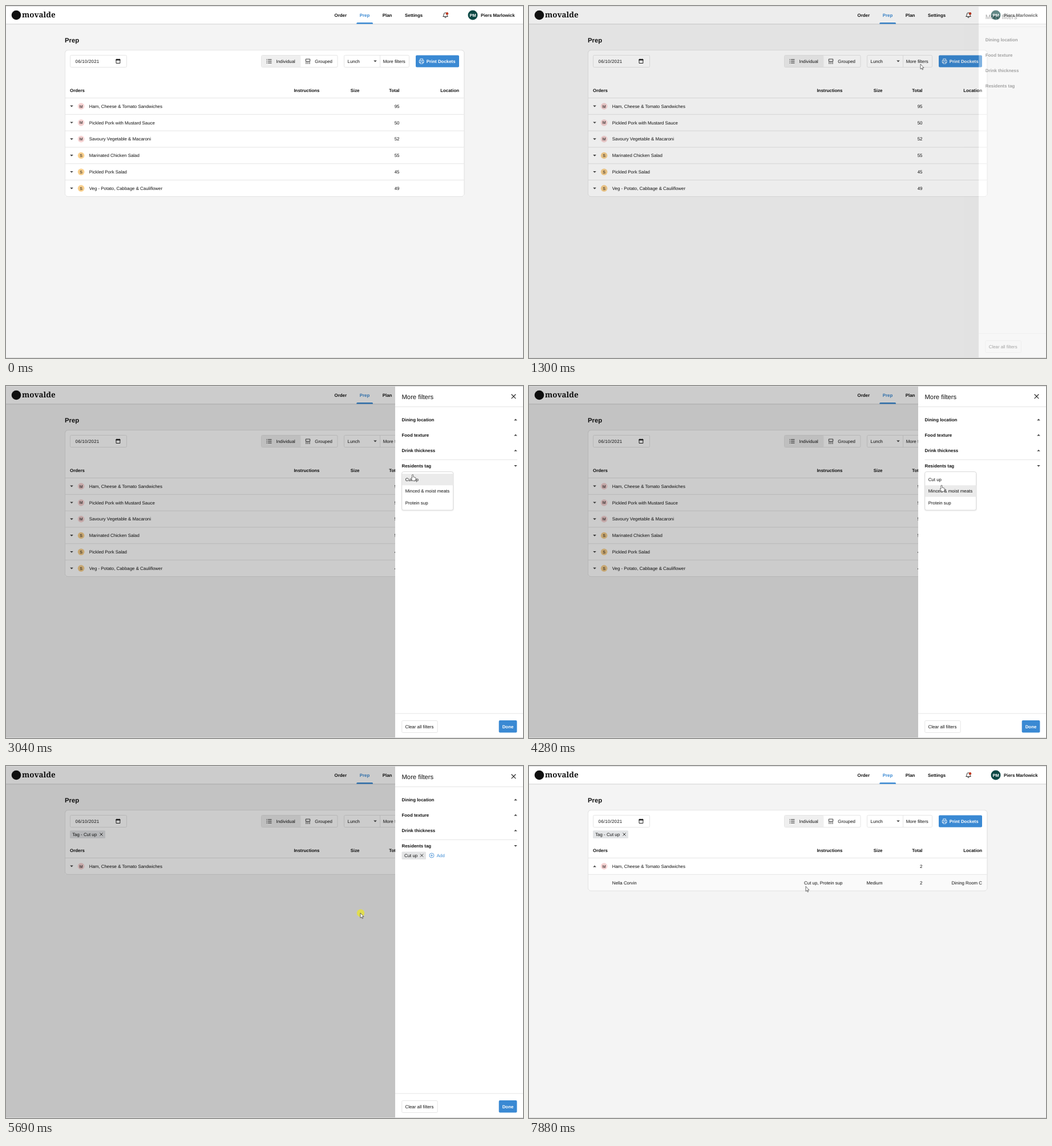
These frames come from a looping animation (906x618 px, 8 s). An HTML page:

```html
<!DOCTYPE html>
<html lang="en">
<head>
<meta charset="utf-8">
<title>Prep</title>
<style>
  html, body { margin: 0; width: 100%; height: 100%; overflow: hidden; background: #f4f4f4; }
  svg { display: block; width: 906px; height: 618px; }
  text { font: 7.88px "Liberation Sans", Arial, sans-serif; fill: #111; text-rendering: geometricPrecision; white-space: pre; }
  .b { font-weight: bold; }
  .h { font-size: 11.25px; }
  .blue { fill: #3a89d3; }
  .w { fill: #fff; }
  .logo { font: bold 13.4px "Noto Serif", serif; }
</style>
</head>
<body>
<svg id="stage" viewBox="0 0 906 618"></svg>
<script>
const BLUE = '#3a89d3', EDGE = '#e5e5e5', DARK = '#222';
const ROW = 28.83, TOP = 161.5;

// Markup helpers; text is placed by its vertical centre.
const text = (x, y, s, cls = '', anchor = 'start', extra = '') =>
  `<text x="${x}" y="${y + (cls.includes('h') ? 4 : 2.8)}" class="${cls}" text-anchor="${anchor}" ${extra}>${s}</text>`;
const rect = (x, y, w, h, fill, r = 0, stroke = 'none', extra = '') =>
  `<rect x="${x}" y="${y}" width="${w}" height="${h}" rx="${r}" fill="${fill}" stroke="${stroke}" ${extra}/>`;
const path = (d, stroke = DARK, w = 1, fill = 'none') =>
  `<path d="${d}" stroke="${stroke}" stroke-width="${w}" fill="${fill}"/>`;
const disc = (x, y, r, fill) => `<circle cx="${x}" cy="${y}" r="${r}" fill="${fill}"/>`;
const group = (id, body, extra = '') => `<g id="${id}" ${extra}>${body}</g>`;
const caret = (x, y, up) => {
  const s = up ? -1 : 1;
  return path(`M${x - 2.8} ${y - 1.4 * s}h5.6L${x} ${y + 1.5 * s}Z`, 'none', 0, '#444');
};
const cross = (x, y, r, w = 0.9) =>
  path(`M${x - r} ${y - r}L${x + r} ${y + r}M${x + r} ${y - r}L${x - r} ${y + r}`, DARK, w);
const addButton = x =>
  `<circle cx="${x}" cy="157" r="4" fill="none" stroke="${BLUE}" stroke-width=".8"/>` +
  path(`M${x - 2} 157h4M${x} 155v4`, BLUE, 0.8) + text(x + 8.8, 157, 'Add', 'blue');

const meals = [
  ['M', 'Ham, Cheese &amp; Tomato Sandwiches', 95],
  ['M', 'Pickled Pork with Mustard Sauce', 50],
  ['M', 'Savoury Vegetable &amp; Macaroni', 52],
  ['S', 'Marinated Chicken Salad', 55],
  ['S', 'Pickled Pork Salad', 45],
  ['S', 'Veg - Potato, Cabbage &amp; Cauliflower', 49]
];

function header() {
  return rect(0, 0, 906, 31.5, '#fff') + rect(0, 31, 906, 1, '#dcdcdc') + rect(0, 32, 906, 1, '#ececec') +
    disc(18, 16, 8.3, '#111') + `<text class="logo" x="28" y="20">movalde</text>` +
    text(575.5, 15.7, 'Order', 'b') + text(619.7, 15.7, 'Prep', 'b blue') +
    text(659.8, 15.7, 'Plan', 'b') + text(699, 15.7, 'Settings', 'b') +
    path('M614.3 31.5V30.5q0-1.5 1.5-1.5h25.700q1.500 0 1.500 1.500v1Z', 'none', 0, BLUE) +
    path('M765.700 18.500q1.500-1.200 1.500-3.500q0-3.200 2.800-3.200t2.800 3.200q0 2.300 1.500 3.500ZM768.800 19.200q0 1.400 1.200 1.400t1.200-1.400', DARK, 0.9) +
    disc(773, 13.3, 2.2, '#c0361c') +
    disc(818, 16, 8.5, '#0b4844') + text(818, 16, 'PM', 'b w', 'middle', 'style="font-size:7.5px"') +
    text(832, 15.7, 'Piers Marlowick', 'b');
}

function toolbar() {
  let list = '';
  for (const y of [94, 97, 100]) list += `M456.5 ${y}h1.4M459 ${y}h6.500`;
  return rect(112.5, 86.5, 99, 21, '#fff', 2, EDGE) +
    text(121.5, 97, '06/10/2021', '', 'start', 'letter-spacing=".26"') +
    path('M193 94h6.800v6.500h-6.800ZM194.700 92.500v1.500M198.100 92.500v1.500') + rect(192.5, 93.5, 7.8, 2, '#111') +
    rect(447.5, 86.5, 133.5, 21, '#fff', 2, EDGE) + rect(448, 87, 68.5, 20, '#efefef', 1.5) +
    path(list) + text(473.5, 97, 'Individual') +
    path('M525.300 93.200h7.400v4h-7.400ZM525 99h2M528 99h2M531 99h2M525 101h2M528 101h2M531 101h2', DARK, 0.9) +
    text(541.3, 97, 'Grouped') +
    rect(592.5, 86.5, 114, 21, '#fff', 2, EDGE) + path('M655.500 86.500v21', EDGE) +
    text(598.5, 97, 'Lunch') + caret(647, 97) + text(660.8, 97, 'More filters') +
    rect(718, 86.5, 76, 21, BLUE, 2) +
    path('M725.800 95.500v-2.700h4.600v2.700M725.800 99.500h-1.600v-4h7.800v4h-1.600M725.800 98h4.600v3.200h-4.600Z', '#fff', 0.8) +
    text(736.8, 97, 'Print Dockets', 'b w');
}

function table() {
  const heads = text(112, 148, 'Orders', 'b') + [['Instructions', 549.5], ['Size', 619.5], ['Total', 689.5], ['Location', 794]]
    .map(([s, x]) => text(x, 148, s, 'b', 'end')).join('');
  const rows = meals.map(([kind, name, total], i) => {
    const y = TOP + i * ROW, mid = y + 14.5;
    return group('row' + i,
      `<rect id="bg${i}" x="104" y="${y}" width="698.500" height="${ROW - 0.5}" fill="#fff"/>` +
      path(`M104 ${y}h698.5`, EDGE) +
      group('down' + i, caret(115, mid)) +
      disc(131.6, mid, 5.8, kind === 'M' ? '#f6d3d3' : '#f9d08e') +
      text(131.6, mid - 0.2, kind, '', 'middle', 'style="font-size:7px"') +
      text(145.8, mid, name) + text(689.5, mid, total, '', 'end', `id="sum${i}"`));
  }).join('');
  const y = TOP + ROW, mid = y + 14.5;
  const detail = rect(104, y, 698.5, ROW - 0.5, '#fafafa') + path(`M104 ${y}h698.500`, EDGE) +
    text(145.8, mid, 'Nella Corvin') + text(549.5, mid, 'Cut up, Protein sup', '', 'end') +
    text(619.5, mid, 'Medium', '', 'end') + text(689.5, mid, '2', '', 'end') + text(794, mid, 'Dining Room C', '', 'end');
  return heads + rows + group('up', caret(115, TOP + 14.5, true)) + group('detail', detail);
}

function panel() {
  const names = ['Dining location', 'Food texture', 'Drink thickness', 'Residents tag'];
  const sections = names.map((s, i) => text(693.5, 59 + 27.1 * i, s, 'b') +
    (i < 3 ? caret(893, 59 + 27.1 * i, true) : '')).join('');
  const items = ['Cut up', 'Minced &amp; moist meats', 'Protein sup'].map((s, i) =>
    rect(694, 154 + 20.3 * i, 89.5, 20.3, '#ebebeb', 0, 'none', `id="item${i}"`) +
    text(699.7, 164 + 20.4 * i, s)).join('');
  return rect(682, 0, 224, 618, '#fff') +
    text(693.5, 18.5, 'More filters', 'h') + cross(889.5, 18.3, 3.8, 1.1) +
    path('M682 36.500h224M682 575h224', EDGE) + sections +
    group('shut', caret(893, 140.3, true)) +
    group('open', path('M693.500 129.500H896', EDGE) + caret(893, 140.3)) +
    group('add', addButton(698.3)) +
    group('menu', rect(692.5, 151, 92.500, 69, '#000', 4, 'none', 'opacity=".05"') +
      rect(693.7, 150.5, 90, 67.500, '#fff', 3, '#d9d9d9') + items) +
    group('chip', rect(693.5, 150.5, 42.5, 13.5, '#e3e4e5', 1.5) + text(698, 157, 'Cut up') +
      cross(728.6, 157, 2.5) + addButton(746)) +
    rect(693.7, 587.5, 62.5, 21, '#fff', 2, EDGE) + text(699.5, 597.7, 'Clear all filters') +
    rect(863.7, 587, 31.700, 21.500, BLUE, 2) + text(879.5, 597.7, 'Done', 'b w', 'middle');
}

document.getElementById('stage').innerHTML =
  rect(0, 0, 906, 618, '#f4f4f4') + header() + text(103, 60, 'Prep', 'b h') +
  rect(103.5, 77.5, 699.5, 257, '#fff', 5, EDGE, 'id="card"') + toolbar() +
  group('tag', rect(112, 113.3, 62, 13.6, '#e3e5e7', 1.5) + text(116.2, 120, 'Tag - Cut up') + cross(167, 120, 2.5)) +
  table() + rect(103.5, 77.5, 699.5, 257, 'none', 5, EDGE, 'id="frame"') +
  group('drawer', rect(0, 0, 682, 618, '#000', 0, 'none', 'id="shade" fill-opacity=".2"') + group('panel', panel())) +
  rect(0, 0, 906, 1, '#d9d9d9') + rect(0, 617, 906, 1, '#d9d9d9') +
  group('cursor', group('click', disc(0.5, 0.2, 6.7, '#e3df45'), 'opacity=".9"') +
    group('arrow', path('M0 0V8.800L2 7 3.300 10 4.600 9.400 3.300 6.500H6Z', '#333', 0.7, '#fff')) +
    group('hand', path('M-1.100 .900a1.100 1.100 0 0 1 2.200 0V4l3.300.800q1.300.400 1.100 1.800L4.600 10.800H.200L-2.700 7q-.500-1 .500-1.300L-1.100 6.400Z', '#333', 0.7, '#fff')));

const el = {};
document.querySelectorAll('[id]').forEach(e => { el[e.id] = e; });
const show = (id, on) => { el[id].style.display = on ? '' : 'none'; };

const moves = [ // time, x, y
  [130, 889, 604], [900, 686, 102], [1300, 686, 102], [1690, 715, 133.5], [1960, 716, 138],
  [2200, 716, 138], [2440, 712, 157], [2630, 712, 157], [2800, 712, 153], [2960, 712, 153],
  [3400, 721, 193], [3680, 722, 205], [3940, 722, 205], [4280, 723, 174.5], [4640, 718, 158],
  [5160, 718, 158], [5620, 621, 258], [5780, 621, 258], [6250, 221.5, 178.5], [6780, 221.5, 178.5],
  [7020, 136, 212], [7300, 350, 219], [7540, 523, 214], [7640, 505, 212], [7880, 485, 211.3], [8000, 485, 211.3]
];
const clicks = [[970, 1100], [2100, 2230], [2830, 2960], [4640, 4780], [5640, 5780], [6510, 6580]];
const slide = [[1225, 0], [1300, 0.35], [1370, 0.78], [1440, 0.96], [1500, 1], [5770, 1], [5850, 0.65], [5920, 0.25], [5990, 0]];

const seek = (list, t) => {
  let i = 0;
  while (i < list.length - 2 && t >= list[i + 1][0]) i++;
  const [a, b] = [list[i], list[i + 1]];
  return [i, Math.min(1, Math.max(0, (t - a[0]) / (b[0] - a[0])))];
};
const lerp = (list, t) => {
  const [i, u] = seek(list, t);
  return list[i][1] + (list[i + 1][1] - list[i][1]) * u;
};
// Slope at a point; zero where the pointer rests or turns back.
const slope = (i, k) => {
  const a = moves[i - 1], b = moves[i], c = moves[i + 1];
  if (!a || !c || (b[k] - a[k]) * (c[k] - b[k]) <= 0) return 0;
  return (c[k] - a[k]) / (c[0] - a[0]);
};
const glide = (t, k) => {
  const [i, u] = seek(moves, t), a = moves[i], b = moves[i + 1], d = b[0] - a[0], v = 1 - u;
  return a[k] * v * v * (1 + 2 * u) + b[k] * u * u * (3 - 2 * u) +
    d * u * v * (slope(i, k) * v - slope(i + 1, k) * u);
};

function draw(t) {
  const x = glide(t, 1), y = glide(t, 2), o = lerp(slide, t);
  const filtered = t >= 4780, expanded = t >= 6580;
  const menu = t >= 2930 && t < 4780, opened = t >= 2170;

  const count = filtered ? 1 : 6;
  const height = TOP + ROW * (expanded ? 2 : count) - 77.5;
  el.card.setAttribute('height', height);
  el.frame.setAttribute('height', height);
  const free = t >= 130 && (t < 1240 || t > 5780) && x > 104 && x < 803 && y > TOP;
  const over = free ? Math.floor((y - TOP) / ROW) : -1;
  for (let i = 0; i < 6; i++) {
    show('row' + i, i < count);
    el['bg' + i].setAttribute('fill', i === over ? '#f5f5f5' : '#fff');
  }
  el.sum0.textContent = filtered ? 2 : 95;
  show('tag', filtered);
  show('down0', !expanded);
  show('up', expanded);
  show('detail', expanded);

  const shift = 165 * (1 - o);
  show('drawer', o > 0);
  el.drawer.setAttribute('opacity', o);
  el.shade.setAttribute('width', 682 + shift);
  el.panel.setAttribute('transform', `translate(${shift})`);
  show('shut', !opened);
  show('open', opened);
  show('add', opened && !filtered);
  show('menu', menu);
  show('chip', filtered);
  for (let i = 0; i < 3; i++) show('item' + i, y >= 154 + 20.3 * i && y < 174.3 + 20.3 * i);

  const hand = (over >= 0 && over < count) || (t > 1450 && t < 5230);
  show('cursor', t >= 130);
  el.cursor.setAttribute('transform', `translate(${x} ${y})`);
  show('hand', hand);
  show('arrow', !hand);
  show('click', clicks.some(([a, b]) => t >= a && t < b));
}

const start = performance.now();
function tick() {
  draw((performance.now() - start) % 8000);
  requestAnimationFrame(tick);
}
tick();
</script>
</body>
</html>
```
